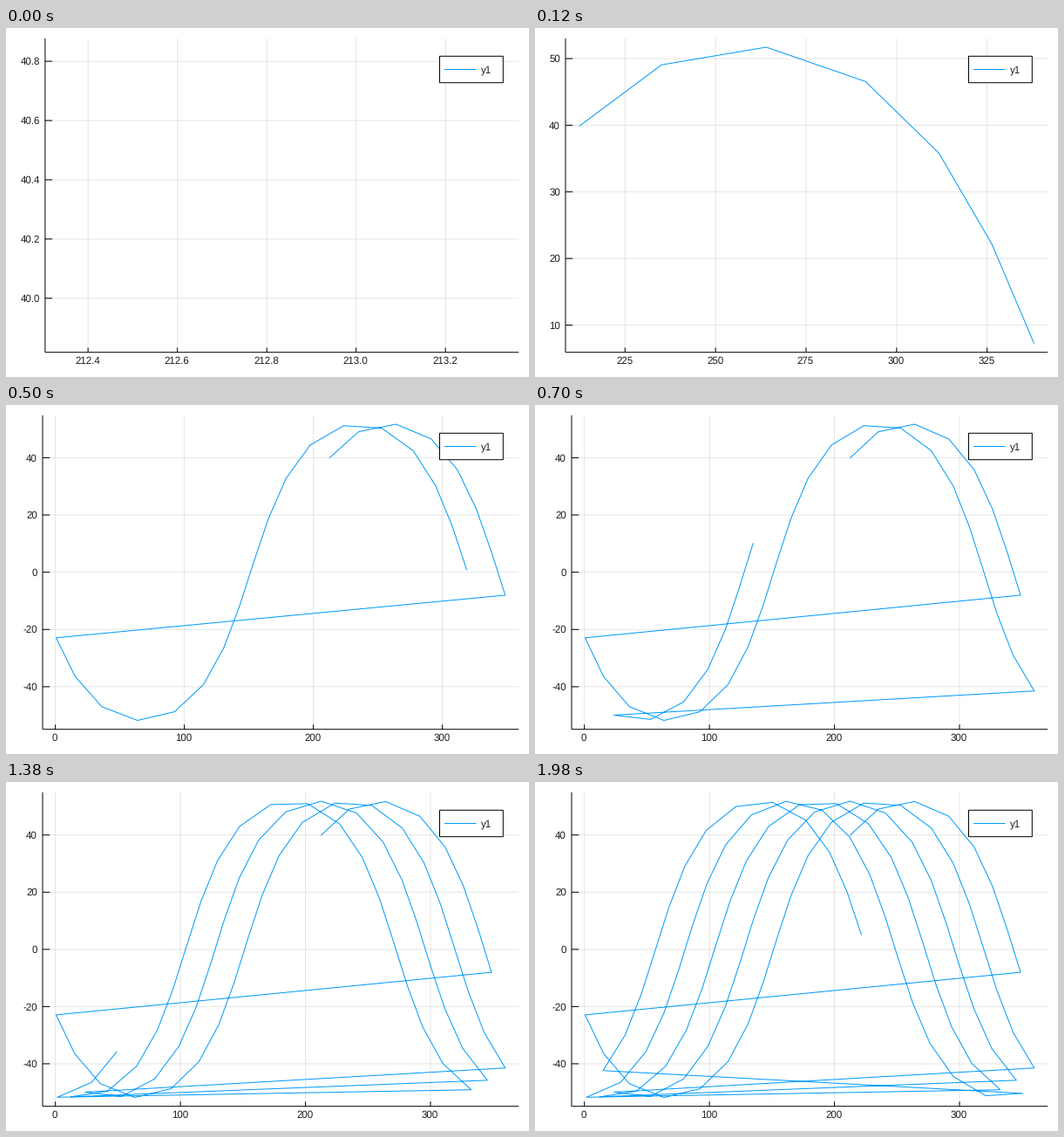
These frames come from a looping animation (600 px wide and 400 px high, 2000 ms). A matplotlib script:

```python
import math

import matplotlib.pyplot as plt
import numpy as np
from matplotlib.animation import FuncAnimation
from matplotlib.patches import Rectangle

W, H, DPI = 600, 400, 100
FRAMES, INTERVAL = 100, 20
PX = 72 / DPI
RIGHT, TOP, BOTTOM = 588.2, 11.8, 371.7
BLUE = "#009afa"
FONT = dict(family="Liberation Sans", size=8.3, color="#1c1c1c")

plt.rcParams["text.hinting"] = "none"
plt.rcParams["text.hinting_factor"] = 8


def ground_track(count):
    """Longitude and latitude of a circular orbit, one point per five minutes."""
    k = np.arange(count)
    incl = math.radians(51.64)
    u = np.radians(54.48 + 19.386 * k)
    node = np.degrees(np.arctan2(math.cos(incl) * np.sin(u), np.cos(u)))
    lon = (171.33 + node - 1.2708 * k) % 360
    lat = np.degrees(np.arcsin(math.sin(incl) * np.sin(u)))
    return lon, lat + 0.1924 * np.sin(np.radians(2 * lat))


LON, LAT = ground_track(FRAMES)


def limits(values):
    lo, hi = values.min(), values.max()
    if lo == hi:
        hi = lo + 1
    pad = 0.03 * (hi - lo)
    return lo - pad, hi + pad


def nice_ticks(lo, hi):
    """Pick the best scoring set of 4 to 8 round ticks; return values and labels."""
    span = hi - lo
    order = math.floor(math.log10(span))
    best, ticks, step = -1, None, 1
    for power in (order - 1, order):
        for q, nice in ((1, 1), (5, 0.9), (2, 0.7), (2.5, 0.5), (3, 0.2)):
            s = q * 10.0 ** power
            first, last = math.ceil(lo / s), math.floor(hi / s)
            n = last - first + 1
            if not 4 <= n <= 8:
                continue
            score = (0.25 * (1 - abs(n - 5) / 5) + (first <= 0 <= last) / 6
                     + 0.5 * span / ((n - 1) * s) + 0.25 * nice)
            if score > best:
                best, step = score, s
                ticks = np.arange(first, last + 1) * s
    digits = next(d for d in range(4) if abs(round(step, d) - step) < 1e-9)
    return ticks, [f"{t:.{digits}f}" for t in ticks]


def label_width(text):
    return sum({".": 3.8, "-": 7}.get(c, 6.1) for c in text)


fig = plt.figure(figsize=(W / DPI, H / DPI), dpi=DPI, facecolor="white")
ax = fig.add_axes([0, 0, 1, 1])


def line(xs, ys, color="black", **kw):
    ax.plot(xs, ys, color=color, lw=PX, snap=False,
            solid_capstyle="butt", **kw)


def draw_legend():
    ax.add_patch(Rectangle((497.5, 32.3), 72.8, 30.4, fc="white", ec="black",
                           lw=PX, zorder=5, snap=False))
    line([503, 539.5], [47.5, 47.5], BLUE, zorder=6)
    ax.text(545, 52, "y1", zorder=6, **FONT)


def draw(i):
    ax.clear()
    ax.set(xlim=(0, W), ylim=(H, 0))
    ax.axis("off")

    lon, lat = LON[:i + 1], LAT[:i + 1]
    (x0, x1), (y0, y1) = limits(lon), limits(lat)
    xticks, xlabels = nice_ticks(x0, x1)
    yticks, ylabels = nice_ticks(y0, y1)
    left = 22.8 + max(map(label_width, ylabels))

    def px(v):
        return left + (v - x0) / (x1 - x0) * (RIGHT - left)

    def py(v):
        return BOTTOM - (v - y0) / (y1 - y0) * (BOTTOM - TOP)

    xtick = 0.015 * (BOTTOM - TOP)
    ytick = 0.015 * (RIGHT - left)
    for x, label in zip(px(xticks), xlabels):
        line([x, x], [TOP, BOTTOM], alpha=0.1, zorder=1)
        line([x, x], [BOTTOM - xtick, BOTTOM], zorder=2)
        ax.text(x - 0.5, 385, label, ha="center", va="baseline", **FONT)
    for y, label in zip(py(yticks), ylabels):
        line([left, RIGHT], [y, y], alpha=0.1, zorder=1)
        line([left, left + ytick], [y, y], zorder=2)
        ax.text(left - 6, y + 4, label, ha="right", va="baseline", **FONT)
    line([left, left], [TOP, BOTTOM], zorder=2)
    line([left, RIGHT], [BOTTOM, BOTTOM], zorder=2)

    if i:
        line(px(lon), py(lat), BLUE, zorder=3, solid_joinstyle="round")
    draw_legend()
    return []


anim = FuncAnimation(fig, draw, frames=FRAMES, interval=INTERVAL,
                     init_func=lambda: draw(0), repeat=True, repeat_delay=0)
plt.show()
```
